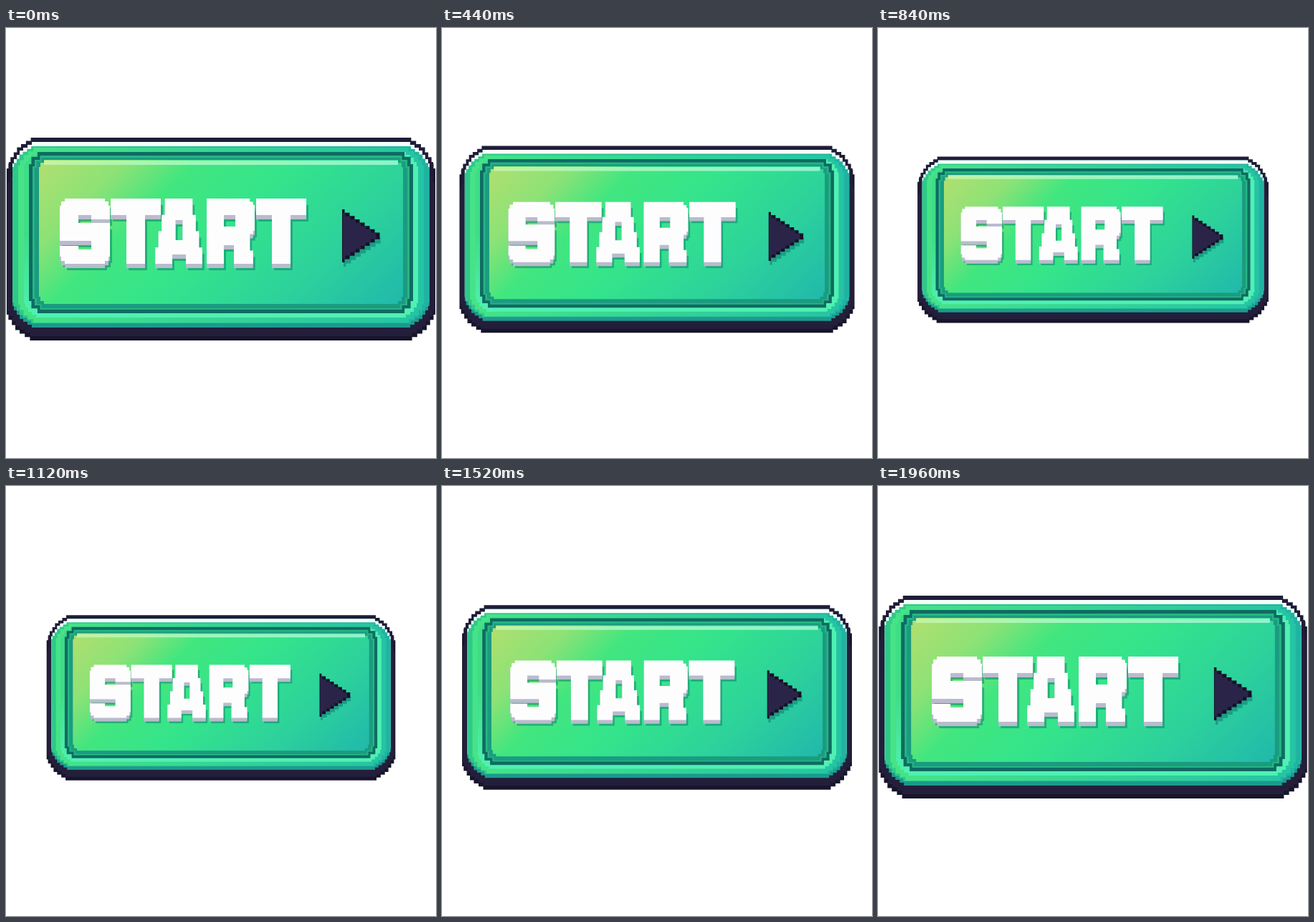
Write an HTML page that moves like this. It is 600 px wide and 600 px high and loops after 2000 ms.

```html
<!DOCTYPE html>
<html lang="en">
<head>
<meta charset="utf-8">
<title>Start button</title>
<style>
  html, body { margin: 0; width: 100%; height: 100%; overflow: hidden; background: #fff; }
  svg { display: block; width: 100vw; height: 100vh; }
</style>
</head>
<body>
<svg viewBox="0 0 600 600" role="img" aria-label="START">
  <defs>
    <linearGradient id="panel" gradientUnits="userSpaceOnUse" x1="47" y1="186" x2="387" y2="541">
      <stop offset="0" stop-color="#b0df70"/>
      <stop offset=".17" stop-color="#8de276"/>
      <stop offset=".31" stop-color="#42e67f"/>
      <stop offset=".5" stop-color="#34e48b"/>
      <stop offset=".75" stop-color="#2dd29b"/>
      <stop offset="1" stop-color="#21b9ab"/>
    </linearGradient>
    <linearGradient id="rim">
      <stop offset="0" stop-color="#2fc98a"/>
      <stop offset="1" stop-color="#20b3a2"/>
    </linearGradient>
    <linearGradient id="frame">
      <stop offset="0" stop-color="#46e486"/>
      <stop offset="1" stop-color="#24c4a4"/>
    </linearGradient>
    <linearGradient id="lip" x2="1" y2="1">
      <stop offset=".25" stop-color="#3fdc88"/>
      <stop offset=".5" stop-color="#50f0b2"/>
    </linearGradient>
    <linearGradient id="shine">
      <stop offset="0" stop-color="#c2f3a2"/>
      <stop offset=".4" stop-color="#a0f6bc"/>
      <stop offset="1" stop-color="#8ff2cc"/>
    </linearGradient>
  </defs>
  <g id="button"></g>
</svg>
<script>
const SIZE = 600, CELL = 4.6;
const FRAME = 40, LOOP = 2000, SHRINK = .193;
const TOP = 238, BOTTOM = 329, BAR = 23;
const button = document.getElementById('button');

// Closed outline whose diagonal edges become pixel stairs.
function outline(points) {
  let d = `M${points[0]}`;
  points.forEach(([x, y], i) => {
    const [nx, ny] = points[(i + 1) % points.length];
    const dx = nx - x, dy = ny - y;
    if (!dx || !dy) {
      d += `L${nx} ${ny}`;
      return;
    }
    const n = Math.max(1, Math.round(Math.min(Math.abs(dx), Math.abs(dy)) / CELL));
    d += `h${dx / n / 2}v${dy / n}h${dx / n / 2}`.repeat(n);
  });
  return d + 'Z';
}

// Box with bulging corners of radius r.
function box(left, top, right, bottom, r = 0) {
  const points = [];
  for (const [sx, sy] of [[1, -1], [1, 1], [-1, 1], [-1, -1]]) {
    const corner = [[r, 0], [.4 * r, .4 * r], [0, r]].map(([x, y]) => [
      sx > 0 ? right - x : left + x,
      sy > 0 ? bottom - y : top + y
    ]);
    points.push(...(sx === sy ? corner.reverse() : corner));
  }
  return outline(points);
}

function draw(d, fill, dx = 0, dy = 0, opacity = 1) {
  const path = document.createElementNS('http://www.w3.org/2000/svg', 'path');
  const attrs = { d, fill, opacity, 'fill-rule': 'evenodd', transform: `translate(${dx} ${dy})` };
  for (const key in attrs) path.setAttribute(key, attrs[key]);
  button.append(path);
}

// Plate centred on the stage.
function slab(inset, top, bottom, r, fill) {
  draw(box(inset, top, SIZE - inset, bottom, r), fill);
}

// Letters: a body plus boxes that cut holes and notches (even-odd).
const letterT = x =>
  box(x, TOP, x + 70, TOP + BAR) + box(x + 22, TOP + BAR, x + 48, BOTTOM);

const letterS = x =>
  box(x, TOP, x + 70, BOTTOM, 10) +
  box(x + 26, TOP + BAR, x + 44, TOP + 34) + box(x + 44, TOP + 29, x + 70, TOP + 34) +
  box(x + 26, BOTTOM - 32, x + 44, BOTTOM - 20) + box(x, BOTTOM - 32, x + 26, BOTTOM - 25);

const letterA = x =>
  outline([[x + 18, TOP], [x + 52, TOP], [x + 70, BOTTOM], [x, BOTTOM]]) +
  outline([[x + 32, TOP + 30], [x + 39, TOP + 30], [x + 42, TOP + 58], [x + 29, TOP + 58]]) +
  box(x + 26, BOTTOM - 13, x + 45, BOTTOM);

const letterR = x =>
  outline([
    [x, TOP], [x + 58, TOP], [x + 67, TOP + 9], [x + 67, TOP + 45],
    [x + 58, TOP + 54], [x + 67, BOTTOM], [x, BOTTOM]
  ]) +
  box(x + 24, TOP + BAR, x + 40, TOP + 39) + box(x + 24, BOTTOM - 26, x + 38, BOTTOM);

const letters = [letterS(75), letterT(146), letterA(206), letterR(280), letterT(349)];

// Casing
slab(1, 160, 436, 36, '#17142b');
slab(4, 153, 420, 34, '#201c38');
slab(2, 180, 430, 35, '#231f3b');
slab(9, 159, 418, 30, '#1b9a8d');
slab(9, 159, 411, 30, '#f4fff8');
slab(9, 165, 412, 29, 'url(#rim)');
slab(17, 167, 411, 25, 'url(#frame)');

// Groove and panel
slab(25, 173, 404, 20, 'url(#lip)');
slab(32, 173, 398, 17, '#0f6b62');
slab(37, 178, 393, 15, '#25b583');
slab(40, 181, 391, 14, '#1b9b80');
slab(46, 184, 385, 10, 'url(#panel)');
slab(53, 185, 191, 0, 'url(#shine)');

// Lettering
letters.forEach(d => draw(d, '#128d6f', 3, 9, .6));
[6, 3].forEach(dy => letters.forEach(d => draw(d, '#b9bccd', 0, dy)));
letters.forEach(d => draw(d, '#fdfdfe'));

// Arrow
const arrow = (x, width, height) => outline([[x, 290 - height], [x + width, 290], [x, 290 + height]]);
draw(arrow(469, 55, 37), '#168f7c', 2, 6, .75);
draw(arrow(469, 56, 37), '#141128');
draw(arrow(470, 50, 32), '#2a2548');

function render(time) {
  const t = Math.floor(time % LOOP / FRAME) * FRAME;
  const scale = 1 - SHRINK * (1 - Math.cos(2 * Math.PI * t / LOOP)) / 2;
  button.setAttribute('transform', `translate(300 300) scale(${scale}) translate(-300 -300)`);
}

const start = performance.now();
function tick() {
  render(performance.now() - start);
  requestAnimationFrame(tick);
}
tick();
</script>
</body>
</html>
```
